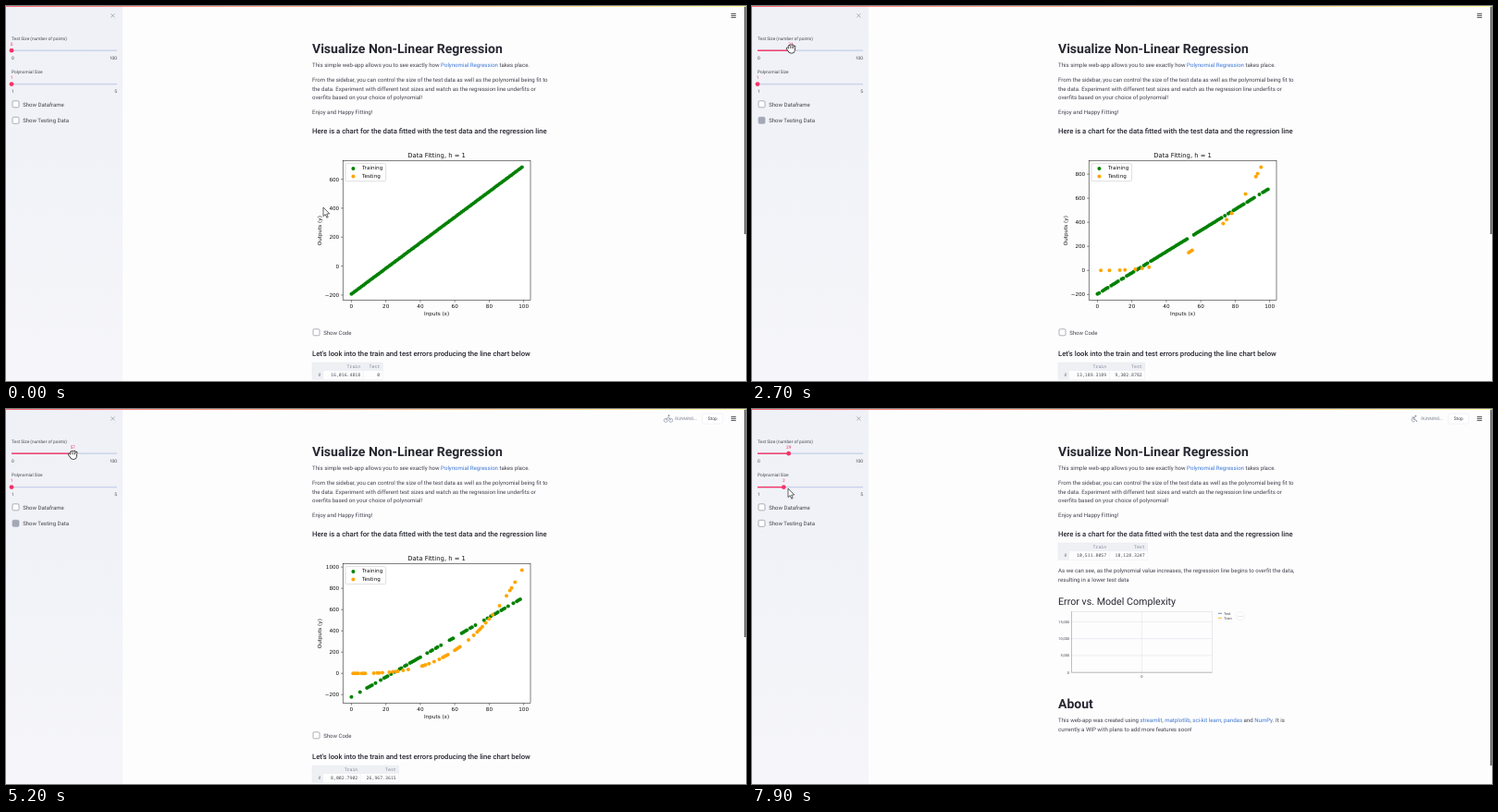
An HTML page with a canvas for the animation above (8000 ms loop, 800 by 406 pixels).

```html
<!DOCTYPE html>
<html lang="en">
<head>
<meta charset="utf-8">
<title>Visualize Non-Linear Regression</title>
<style>
html, body { margin: 0; width: 100%; height: 100%; overflow: hidden; background: #fdfdfe; }
canvas { display: block; width: 800px; height: 406px; }
</style>
</head>
<body>
<canvas id="stage"></canvas>
<script>
const LOOP = 8000, STEP = 100, GRAB = 1400, RELEASE = 6200;
const INK = '#262730', SOFT = '#44454e', GREY = '#808495', RED = '#f63366', LINK = '#4079d2';
const SANS = 'Roboto, sans-serif', MONO = '"Noto Sans Mono", monospace', PLOT = '"DejaVu Sans", sans-serif';

const canvas = document.getElementById('stage'), c = canvas.getContext('2d');
const dpr = window.devicePixelRatio || 1;
canvas.width = 800 * dpr;
canvas.height = 406 * dpr;
c.scale(dpr, dpr);

// Mersenne Twister, 32-bit outputs
function twister(seed) {
  const s = [seed];
  for (let i = 1; i < 624; i++) s[i] = (Math.imul(1812433253, s[i - 1] ^ s[i - 1] >>> 30) + i) >>> 0;
  let i = 0;
  return () => {
    const y = s[i] & 0x80000000 | s[(i + 1) % 624] & 0x7fffffff;
    let v = s[i] = (s[(i + 397) % 624] ^ y >>> 1 ^ (y & 1 ? 0x9908b0df : 0)) >>> 0;
    i = (i + 1) % 624;
    v ^= v >>> 11;
    v ^= v << 7 & 0x9d2c5680;
    v ^= v << 15 & 0xefc60000;
    return (v ^ v >>> 18) >>> 0;
  };
}

// Seeded shuffle of the 100 samples, as in train_test_split
function permutation(n) {
  const a = [...Array(n).keys()], next = twister(0);
  for (let i = n - 1; i > 0; i--) {
    const mask = 2 ** (32 - Math.clz32(i)) - 1;
    let j;
    do j = next() & mask; while (j > i);
    [a[i], a[j]] = [a[j], a[i]];
  }
  return a;
}
const ORDER = permutation(100);

// Straight least-squares fit of y = x³ / 1000
const cube = x => x ** 3 / 1000;
function fit(xs) {
  const mean = f => xs.reduce((s, x) => s + f(x), 0) / xs.length;
  const mx = mean(x => x), my = mean(cube);
  const slope = mean(x => (x - mx) * (cube(x) - my)) / mean(x => (x - mx) ** 2);
  return x => my + slope * (x - mx);
}

function regress(n) {
  const test = ORDER.slice(0, n), train = ORDER.slice(n), model = fit(train);
  const error = (xs, scale) => {
    const sum = xs.reduce((s, x) => s + (cube(x) - model(x)) ** 2, 0);
    return sum ? (sum / scale).toLocaleString('en-US', { minimumFractionDigits: 4, maximumFractionDigits: 4 }) : '0';
  };
  return { test, train, model, errors: [error(train, 78.68), error(test, 24.3)] };
}

// Pointer key points: time, x, y
const PATH = [[0, 343, 218], [900, 6, 48], [GRAB, 6, 46], [1900, 23, 44.5], [3400, 59, 48], [4400, 91.6, 50],
  [4800, 94.2, 50], [5800, 39.6, 49], [RELEASE, 39.6, 49], [6700, 4.5, 83.5], [7300, 4.5, 83.5], [7600, 39, 86]];

function pointer(t) {
  const i = PATH.findIndex(p => p[0] > t);
  if (i < 0) return PATH[PATH.length - 1].slice(1);
  const [t0, x0, y0] = PATH[i - 1], [t1, x1, y1] = PATH[i];
  const k = (t - t0) / (t1 - t0);
  return [x0 + (x1 - x0) * k, y0 + (y1 - y0) * k];
}

const SIZE_PX = 1.16, DEGREE_PX = 28.3;
const sizeAt = t => t < GRAB ? 0 : Math.round((pointer(Math.min(t, RELEASE))[0] - 6) / SIZE_PX);
const degreeAt = t => t < 7300 ? 1 : Math.max(1, Math.round(1 + (pointer(t)[0] - 6) / DEGREE_PX));

// Each run takes the slider value at its start and shows it shortly before its end.
const RUNS = [[2000, 2700], [3400, 4100], [4800, 5700], [RELEASE, 6800], [7600, 8300]];
function chartSize(t) {
  const done = RUNS.filter(r => t >= r[1] - 200).pop();
  return done ? sizeAt(done[0]) : 0;
}

function text(s, x, y, size, { color = SOFT, weight = 400, font = SANS, align = 'left' } = {}) {
  c.font = `${weight} ${size}px ${font}`;
  c.textRendering = 'geometricPrecision';
  c.textAlign = align;
  c.fillStyle = color;
  c.fillText(s, x, y);
  return c.measureText(s).width;
}

function rect(x, y, w, h, fill) {
  c.fillStyle = fill;
  c.fillRect(x, y, w, h);
}

function frame(x, y, w, h, color, width) {
  c.strokeStyle = color;
  c.lineWidth = width;
  c.strokeRect(x, y, w, h);
}

function box(x, y, w, h, r, fill, stroke, width = 0.6) {
  c.beginPath();
  c.roundRect(x, y, w, h, r);
  c.fillStyle = fill;
  c.fill();
  c.strokeStyle = stroke;
  c.lineWidth = width;
  c.stroke();
}

function line(points, color, width) {
  c.beginPath();
  points.forEach(([x, y]) => c.lineTo(x, y));
  c.strokeStyle = color;
  c.lineWidth = width;
  c.stroke();
}

function arc(x, y, r, from, to, color, width) {
  c.beginPath();
  c.arc(x, y, r, from, to);
  c.strokeStyle = color;
  c.lineWidth = width;
  c.stroke();
}

function dot(x, y, r, fill) {
  c.beginPath();
  c.arc(x, y, r, 0, 7);
  c.fillStyle = fill;
  c.fill();
}

function gradient(x, y, from, to) {
  const g = c.createLinearGradient(0, 0, x, y);
  g.addColorStop(0, from);
  g.addColorStop(1, to);
  return g;
}

const heading = (s, y) => text(s, 331, y, 7.7, { weight: 500, color: INK });
const title = (s, y) => text(s, 331, y, 14, { weight: 700, color: INK });

// Lines of one paragraph; parts between bars are links.
function paragraph(y, ...lines) {
  lines.forEach((s, row) => {
    let x = 331;
    s.split('|').forEach((part, i) => x += text(part, x, y + row * 9.7, 6.1, { color: i % 2 ? LINK : SOFT }));
  });
}

function checkbox(x, y, label, pressed) {
  box(x, y, 7, 7, 1.2, pressed ? '#a3a8b6' : '#fff', pressed ? '#a3a8b6' : '#8b8f99', 0.7);
  text(label, x + 11.2, y + 5.7, 6);
}

function slider(y, label, lo, hi, value, x) {
  text(label, 6, y - 11.4, 4.78);
  rect(6, y - 0.7, 114, 1.4, '#cad2ea');
  rect(6, y - 0.7, x - 6, 1.4, RED);
  dot(x, y, 2.4, RED);
  text(value, x, y - 5.2, 4.8, { color: RED, align: 'center' });
  text(lo, 6, y + 9.6, 4.8);
  text(hi, 120, y + 9.6, 4.8, { align: 'right' });
}

function sidebar(t) {
  rect(0, 0, 126, 406, gradient(0, 406, '#eff1f6', '#f5f5fa'));
  line([[113.4, 8.4], [117.4, 12.4]], '#8b8f9b', 0.7);
  line([[117.4, 8.4], [113.4, 12.4]], '#8b8f9b', 0.7);
  const size = sizeAt(t), degree = degreeAt(t);
  slider(48.2, 'Test Size (number of points)', '0', '100', size, 6 + size * SIZE_PX);
  slider(84.6, 'Polynomial Size', '1', '5', degree, 6 + (degree - 1) * DEGREE_PX);
  checkbox(7, 102.8, 'Show Dataframe');
  checkbox(7, 120.3, 'Show Testing Data', t >= GRAB && t < RELEASE);
}

function bike() {
  for (const x of [713.3, 718.8]) arc(x, 12.3, 2, 0, 7, GREY, 0.6);
  line([[713.3, 12.3], [715.2, 9.2], [717, 9.4], [718.8, 12.3]], GREY, 0.7);
  dot(716.6, 7.2, 0.9, GREY);
}

function wheelchair() {
  arc(715.3, 11.8, 2.1, 1, 5, GREY, 0.7);
  line([[713.4, 9], [716.6, 9], [715.4, 11.4], [718, 12], [718.9, 14]], GREY, 0.8);
  dot(717.5, 7.6, 0.9, GREY);
}

function header(t) {
  const run = RUNS.find(r => t >= r[0] && t < r[1]);
  if (run) {
    c.globalAlpha = Math.min(1, (t - run[0] + 200) / 400);
    (t < 7000 ? bike : wheelchair)();
    text('RUNNING...', 723.3, 12.3, 4.7, { color: GREY });
    box(752.8, 5.2, 22, 10.8, 1.5, '#fff', '#e4e6ec', 0.5);
    text('Stop', 763.8, 12.3, 4.9, { align: 'center' });
    c.globalAlpha = 1;
  }
  for (const y of [8.4, 10.4, 12.4]) line([[783.8, y], [789.2, y]], INK, 0.8);
  rect(0, 0, 800, 0.8, gradient(800, 0, '#ff4b5b', '#fffd80'));
}

function table(y, [train, test]) {
  const ch = 4.88 * 0.6, mid = 351 + train.length * ch;
  const end = mid + 9.3 + Math.max(4, test.length) * ch;
  const w = end + 3 - 331;
  rect(331, y, w, 9, '#eef0f4');
  rect(331, y + 9, 12, 9.2, '#eef0f4');
  frame(331, y, w, 18.4, '#e3e5ec', 0.4);
  line([[mid + 3, y + 9], [mid + 3, y + 18.4]], '#e3e5ec', 0.4);
  const cell = (s, x, dy, color) => text(s, x, y + dy, 4.88, { font: MONO, align: 'right', color });
  cell('Train', mid, 6.3, GREY);
  cell('Test', end, 6.3, GREY);
  cell('0', 340.5, 15.3, GREY);
  cell(train, mid, 15.3);
  cell(test, end, 15.3);
}

function plot({ test, train, model }) {
  const L = 364.2, T = 167.7, W = 202.8, H = 151;
  const ys = [...test.map(cube), ...train.map(model)];
  const lo = Math.min(...ys), hi = Math.max(...ys), pad = (hi - lo) * 0.05;
  const px = x => L + W * (x / 99 + 0.05) / 1.1;
  const py = y => T + H * (hi + pad - y) / (hi - lo + 2 * pad);
  const label = (s, x, y, align = 'center', size = 5.65) => text(s, x, y, size, { font: PLOT, align, color: '#111' });

  rect(L, T, W, H, '#fff');
  train.forEach(x => dot(px(x), py(model(x)), 2, '#008000'));
  test.forEach(x => dot(px(x), py(cube(x)), 2, '#ffa500'));
  frame(L, T, W, H, '#000', 0.5);
  for (let x = 0; x <= 100; x += 20) {
    line([[px(x), T + H], [px(x), T + H + 2]], '#000', 0.5);
    label(x, px(x), 327.2);
  }
  for (let y = Math.ceil((lo - pad) / 200) * 200; y <= hi + pad; y += 200) {
    line([[L - 2, py(y)], [L, py(y)]], '#000', 0.5);
    label(String(y).replace('-', '−'), L - 4, py(y) + 2.1, 'right');
  }
  label('Data Fitting, h = 1', L + W / 2, 164.3, 'center', 6.8);
  label('Inputs (x)', L + W / 2, 335.2);
  c.save();
  c.translate(341, T + H / 2);
  c.rotate(-Math.PI / 2);
  label('Outputs (y)', 0, 0);
  c.restore();

  box(367, 170.6, 43.6, 19, 1.2, 'rgba(255,255,255,.8)', '#ccc');
  dot(375.4, 176, 2, '#008000');
  dot(375.4, 184.4, 2, '#ffa500');
  label('Training', 385, 177.4, 'left');
  label('Testing', 385, 185.9, 'left');
}

function errorChart() {
  const small = (s, x, y, align) => text(s, x, y, 3.9, { align });
  for (let i = 0; i < 4; i++) {
    const y = 285.2 - i * 18.3;
    line([[344, y], [497.5, y]], '#dcdde2', 0.5);
    small((i * 5000).toLocaleString('en-US'), 343, y + 1.4, 'right');
  }
  frame(345.5, 219.3, 152, 65.9, '#d4d5da', 0.5);
  line([[421.4, 219.3], [421.4, 287]], '#dcdde2', 0.5);
  line([[345.5, 219.3], [345.5, 285.2], [497.5, 285.2]], '#92949c', 0.5);
  small('0', 421.4, 291, 'center');
  line([[504, 221.3], [508, 221.3]], '#4c78a8', 0.8);
  line([[504, 226.3], [508, 226.3]], '#ffa500', 0.8);
  small('Test', 510, 222.7);
  small('Train', 510, 227.7);
  box(523.4, 219.7, 9, 9, 4.5, '#fff', '#dddfe4', 0.4);
  for (const x of [526, 528, 530]) dot(x, 224.2, 0.45, '#999');
}

function page(t) {
  const result = regress(chartSize(t)), reloading = t >= 7700;
  title('Visualize Non-Linear Regression', 51);
  paragraph(66.4, 'This simple web-app allows you to see exactly how |Polynomial Regression| takes place.');
  paragraph(81.8,
    'From the sidebar, you can control the size of the test data as well as the polynomial being fit to',
    'the data. Experiment with different test sizes and watch as the regression line underfits or',
    'overfits based on your choice of polynomial!');
  paragraph(116.5, 'Enjoy and Happy Fitting!');
  heading('Here is a chart for the data fitted with the test data and the regression line', 138.2);
  if (reloading) {
    table(145, result.errors);
    paragraph(176.8,
      'As we can see, as the polynomial value increases, the regression line begins to overfit the data,',
      'resulting in a lower test data');
    text('Error vs. Model Complexity', 331, 212.3, 10.68, { color: INK });
    errorChart();
    title('About', 324.3);
    paragraph(339.4,
      'This web-app was created using |streamlit|, |matplotlib|, |sci-kit learn|, |pandas| and |NumPy|. It is',
      'currently a WIP with plans to add more features soon!');
  } else {
    plot(result);
    checkbox(332, 349.8, 'Show Code');
    heading("Let's look into the train and test errors producing the line chart below", 379.4);
    table(386, result.errors);
  }
  rect(798, 0, 2, reloading ? 386 : 247, '#77777b');
}

function arrow(x, y) {
  c.beginPath();
  [[0, 0], [0, 9.6], [2.2, 7.6], [3.8, 11.2], [5.2, 10.5], [3.7, 7.1], [6.7, 6.9]]
    .forEach(([dx, dy]) => c.lineTo(x + dx, y + dy));
  c.closePath();
  c.fillStyle = '#fff';
  c.fill();
  c.strokeStyle = '#222';
  c.lineWidth = 0.7;
  c.stroke();
}

function hand(x, y) {
  c.lineCap = 'round';
  for (const [color, grow] of [['#222', 0.7], ['#fff', 0]]) {
    for (let i = 0; i < 4; i++) {
      const dx = i * 1.9 - 2;
      line([[x + dx, y - 3.6 + (i - 1.3) ** 2 * 0.5], [x + dx * 0.8, y + 0.5]], color, 1.4 + grow * 2);
    }
    line([[x - 4, y - 0.3], [x - 1.5, y + 2.3]], color, 1.5 + grow * 2);
    c.beginPath();
    c.ellipse(x + 0.5, y + 1.5, 3.2 + grow, 2.9 + grow, 0, 0, 7);
    c.fillStyle = color;
    c.fill();
  }
  for (const dx of [-0.8, 1, 2.6]) line([[x + dx, y - 2.2], [x + dx, y - 0.4]], '#222', 0.5);
  c.lineCap = 'butt';
}

function draw(t) {
  rect(0, 0, 800, 406, '#fdfdfe');
  page(t);
  sidebar(t);
  header(t);
  const grabbing = t >= GRAB && t < RELEASE || t >= 6700 && t < 7600;
  (grabbing ? hand : arrow)(...pointer(t));
}

let shown = -1;
const start = performance.now();
function tick(now) {
  const t = Math.floor(Math.max(0, now - start) % LOOP / STEP) * STEP;
  if (t !== shown) draw(shown = t);
  requestAnimationFrame(tick);
}
draw(0);
requestAnimationFrame(tick);
</script>
</body>
</html>
```
